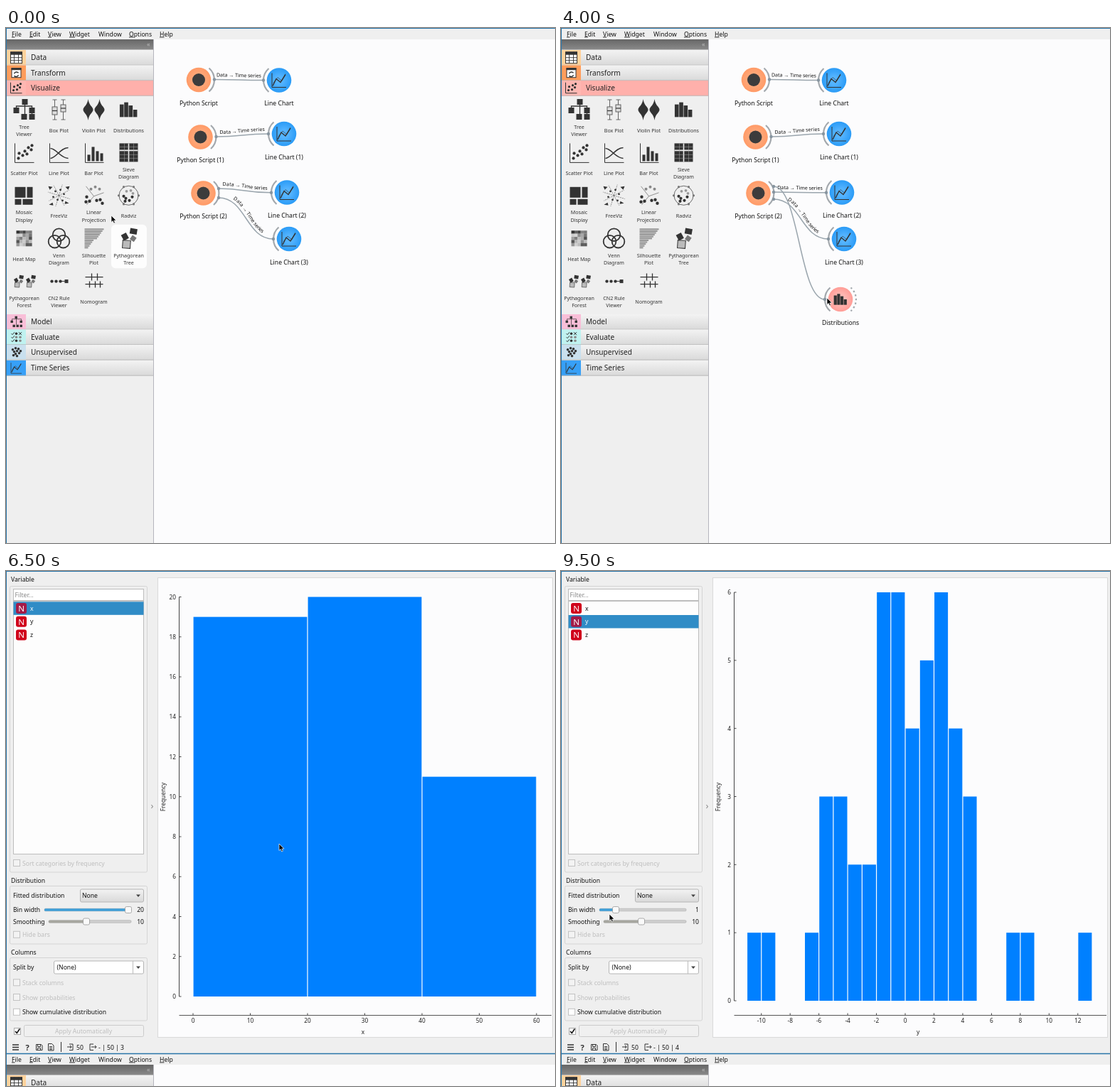
Recreate the animation shown at these times as an HTML page. Size 772 px wide and 725 px high, loop 10 s.

```html
<!DOCTYPE html>
<html lang="en">
<head>
<meta charset="utf-8">
<title>Visual workflow</title>
<style>
html, body { margin: 0; width: 100%; height: 100%; overflow: hidden; background: #fcfcfd; }
svg { display: block; width: 772px; height: 725px; font-family: "Noto Sans", "Open Sans", sans-serif; }
</style>
</head>
<body>
<svg id="stage" viewBox="0 0 772 725" xmlns="http://www.w3.org/2000/svg"></svg>
<script>
const STEP = 500, STEPS = 20;
const INK = '#333', BLUE = '#308cc6', BAR = '#0080ff', OFF = '#bebebe', EDGE = '#2874a8';
const stage = document.getElementById('stage');

// Drawing helpers
const rect = (x, y, w, h, fill, more = '') => `<rect x="${x}" y="${y}" width="${w}" height="${h}" fill="${fill}" ${more}/>`;
const dot = (x, y, r, fill = INK, more = '') => `<circle cx="${x}" cy="${y}" r="${r}" fill="${fill}" ${more}/>`;
const ring = (x, y, r, w = 1) => dot(x, y, r, 'none', `stroke="${INK}" stroke-width="${w}"`);
const line = (d, w = 1, color = INK, more = '') => `<path d="${d}" fill="none" stroke="${color}" stroke-width="${w}" ${more}/>`;
const fill = (d, color = INK) => `<path d="${d}" fill="${color}"/>`;
const text = (s, x, y, size = 8.65, color = '#111', more = '') => `<text x="${x}" y="${y}" font-size="${size}" fill="${color}" ${more}>${s}</text>`;
const mid = 'text-anchor="middle"', end = 'text-anchor="end"';
const at = (x, y, body, scale = 1) => `<g transform="translate(${x} ${y}) scale(${scale})">${body}</g>`;
const dots = (list, r) => list.map(([x, y]) => dot(x, y, r)).join('');
const boxes = (list, s) => list.map(([x, y]) => rect(x, y, s, s, INK)).join('');

const defs = `<defs>
  <linearGradient id="btn" x2="0" y2="1"><stop stop-color="#f3f3f3"/><stop offset="1" stop-color="#d9d9d9"/></linearGradient>
  <linearGradient id="head" x2="0" y2="1"><stop stop-color="#666"/><stop offset="1" stop-color="#8a8a8a"/></linearGradient>
  <radialGradient id="orange"><stop offset=".3" stop-color="#ffae82"/><stop offset="1" stop-color="#ff9a66"/></radialGradient>
  <radialGradient id="blue"><stop offset=".3" stop-color="#55b4ff"/><stop offset="1" stop-color="#2a9bf6"/></radialGradient>
  <radialGradient id="pink"><stop offset=".3" stop-color="#ffbdb8"/><stop offset="1" stop-color="#ff9c96"/></radialGradient>
  <filter id="soft" x="-50%" y="-50%" width="200%" height="200%"><feGaussianBlur stdDeviation="2"/></filter>
</defs>`;

// Icons, centred on 0,0
const histIcon = [[-17, 24], [-8.5, 28], [0, 22], [8.5, 14]].map(([x, h]) => rect(x, 14 - h, 7.6, h, INK)).join('');
const chartIcon = line('M-10-10V10H10', 1) + line('M-9 8L-4-2L2 3L9-8', 1.4) + line('M-8 4L-2-4L4 1L9-9', .6);
const treeIcon = boxes([[-2, -8], [-8, -2], [5, -2], [-5, 4], [0, 4], [5, 4]], 3.4) + line('M-6-2V-4H7V-2M0-5V4', .7);
const gridIcon = rect(-8, -8, 16, 16, '#fff', `stroke="${INK}"`) + rect(-8, -8, 16, 4, INK) + line('M-8 0H8M-8 4H8M-3-8V8M3-8V8', .9);
const swapIcon = rect(-6.5, -6.5, 13, 13, '#fff', `stroke="${INK}"`) + rect(-7, -7, 14, 3, INK) + line('M-3 1A3.5 3.5 0 0 1 3 0M3 3A3.5 3.5 0 0 1-3 4', 1.5);
const scatterIcon = line('M-8-8V7H8', 1) + dots([[-4, 3], [-3, -2], [1, 2], [2, -4], [5, -1], [6, -6]], 1.6);
const evalIcon = [-5, 0, 5].map(y => line(`M-7 ${y}l1.5 1.5l3-3.500`, 1) + dot(0, y, 1.8, y ? INK : '#888') + dot(5.5, y, y < 0 ? 0 : 1.8, '#888')).join('') + line('M3.500-7l4 4m0-4l-4 4', 1);
const clusterIcon = dots([[-5, -4], [-1, -6], [3, -5], [6, -2], [-3, -1], [1, -2], [4, 1], [-1, 2], [-4, 4], [1, 5]], 1.8);

const polar = (r, n, off = 0) => [...Array(n)].map((_, i) => [r * Math.cos(off + i * 2 * Math.PI / n), r * Math.sin(off + i * 2 * Math.PI / n)]);
const spokes = (r, n, off) => line(polar(r, n, off).map(([x, y]) => `M0 0L${x} ${y}`).join(''), .8, '#777', 'stroke-dasharray="2 1"');
const violin = x => fill(`M${x} -15C${x + 1} -6 ${x + 7} -4 ${x + 7} 0C${x + 7} 4 ${x + 1} 6 ${x} 15C${x - 1} 6 ${x - 7} 4 ${x - 7} 0C${x - 7} -4 ${x - 1} -6 ${x} -15`);
const whisker = (x, a, b) => line(`M${x - 3} -14H${x + 3}M${x} -14V${a}M${x} ${b}V14M${x - 3} 14H${x + 3}`, .9, '#555')
  + rect(x - 3.5, a, 7, b - a, '#ddd', 'stroke="#555" stroke-width=".9"') + line(`M${x - 3.5} ${(a + b) / 2}h7`, 1.2);
const pyth = rect(-8, 3, 11, 11, '#bbb', `stroke="${INK}" transform="rotate(4)"`)
  + rect(-9, -7, 8, 9, INK, 'transform="rotate(-28 -5 -2)"') + rect(3, -3, 7, 7, '#777', 'transform="rotate(35 7 0)"') + rect(0, -15, 10, 8, INK, 'transform="rotate(10)"');

const tools = [
  ['Tree|Viewer', boxes([[-3, -15], [-15, -3], [7, -3], [-4, 6], [7, 6]], 8) + line('M1-8V8M-11-3V-5H11V8', 1.3)],
  ['Box Plot', whisker(-6, -4, 7) + whisker(6, -7, 3)],
  ['Violin Plot', violin(-8) + violin(8)],
  ['Distributions', at(0, 0, histIcon, .74)],
  ['Scatter Plot', line('M-13-13V14H14', 1) + dots([[-8, 8], [-7, 1], [-2, 4], [1, -2], [4, 2], [6, -7], [10, -4], [11, -10]], 2.1)],
  ['Line Plot', line('M-13-13V14H14', 1) + line('M-12-6C-4-6 2 8 13 8M-12 8C-4 8 2-7 13-7', 1.5)],
  ['Bar Plot', line('M-12-13V14H14', 1) + [[-9, 9], [-3, 20], [3, 14], [9, 11]].map(([x, h]) => rect(x, 12 - h, 4, h, INK)).join('')],
  ['Sieve|Diagram', rect(-13, -13, 26, 26, INK) + line('M0-13V13M-13-3H13', 1.6, '#eee') + line('M-13-8H13M-13 3H13M-13 8H13M-6-13V13M7-13V13', .5, '#aaa')],
  ['Mosaic|Display', rect(-13, -12, 15, 15, INK) + rect(4, -12, 8, 15, INK) + rect(-13, 5, 9, 8, INK) + rect(-2, 5, 14, 8, INK)],
  ['FreeViz', spokes(16, 8, .3) + dots([[-5, -6], [2, -8], [7, -2], [-8, 2], [-2, 6], [5, 7]], 1.4) + fill('M-15-13l6 1l-4 4zM15-13l-6 1l4 4zM-14 13l5-3l1 4zM14 11l-5-3l-1 4z')],
  ['Linear|Projection', line('M0 1L-11-13M0 1L14-4M0 1L-10 13', .8, '#777') + dots([[-10, 2], [-6, 8], [-11, 9], [4, 7], [9, 6], [12, 11]], 2.2) + [[-4, -9], [2, -12], [8, -9]].map(p => dot(...p, 2, '#888')).join('')],
  ['Radviz', ring(0, 0, 13.5, .7) + polar(14, 6).map(p => dot(...p, 1.6, '#777')).join('') + dots([[-4, 4], [-7, 1], [-5, 8], [1, 7], [5, 2]], 2.1) + [[-3, -6], [3, -7], [6, -3]].map(p => dot(...p, 1.9, '#999')).join('')],
  ['Heat Map', [...Array(25)].map((_, i) => { const v = 50 + i * i * 47 % 170; return rect(i % 5 * 4.4 - 11, (i / 5 | 0) * 4.4 - 11, 4.5, 4.5, `rgb(${v},${v},${v})`); }).join('')],
  ['Venn|Diagram', ring(0, -5, 8.8, 1.8) + ring(-6, 4.5, 8.8, 1.8) + ring(6, 4.5, 8.8, 1.8)],
  ['Silhouette|Plot', [...Array(11)].map((_, i) => rect(-13, -14 + i * 2.6, 27 - i * 1.9 - (i > 5 ? 3 : 0), 2.2, '#999')).join('')],
  ['Pythagorean|Tree', pyth],
  ['Pythagorean|Forest', at(-8, 0, pyth, .6) + at(9, 0, pyth, .6)],
  ['CN2 Rule|Viewer', dots([[-10, 0], [-4, 0], [2, 0]], 2.2) + line('M3 0H9', 1) + rect(8, -2.5, 5, 5, INK)],
  ['Nomogram', line('M-12-6H13M-12 4H13M-3-11V-1M5-11V-1M-6 0V9M2 0V9M9 0V9', 1.3)]
];

const categories = [
  [31, 'Data', '#ffd29c', gridIcon], [52.5, 'Transform', '#ff9d5c', swapIcon], [74, 'Visualize', '#ffb7b2', scatterIcon],
  [403, 'Model', '#f9bfd8', treeIcon], [424.5, 'Evaluate', '#c0f2f0', evalIcon], [446, 'Unsupervised', '#c9e0ee', clusterIcon], [468, 'Time Series', '#37a0f7', at(0, 0, chartIcon, .75)]
];

const menu = () => [[8, 'File'], [33, 'Edit'], [59, 'View'], [89, 'Widget'], [130, 'Window'], [173, 'Options'], [216, 'Help']]
  .map(([x, s]) => text(s === 'Window' ? s : `<tspan text-decoration="underline">${s[0]}</tspan>${s.slice(1)}`, x, 11.5)).join('');

const cell = i => [25.5 + i % 4 * 49, 95.5 + (i / 4 | 0) * 60.4];

function sidebar(hover, pressed) {
  let s = rect(0, 0, 772, 16, '#efefef') + rect(0, 16, 208, 709, '#efefef') + rect(1, 16, 206, 14.5, 'url(#head)') + text('«', 198, 26, 9, '#bbb');
  for (const [y, name, color, icon] of categories) {
    s += rect(1, y, 206, 21.5, name === 'Visualize' ? '#ffb0ab' : 'url(#btn)') + rect(1, y, 27, 21.5, color)
      + line(`M1 ${y + 21.2}H207`, .8, '#b4b4b4') + at(14.5, y + 10.7, icon) + text(name, 35, y + 14.4, 10.05, '#222');
  }
  if (hover >= 0) {
    const [x, y] = cell(hover);
    s += rect(x - 24.5, y, 50, 61.5, '#fdfdfd', 'rx="6"');
  }
  if (pressed) s += rect(148, 96, 49, 60, '#9b9b9b', 'rx="6"');
  tools.forEach(([name, icon], i) => {
    const [x, y] = cell(i), rows = name.split('|');
    s += at(x, y + 19.5, icon) + rows.map((r, j) => text(r, x, y + (rows.length > 1 ? 46 + 10.3 * j : 51), 7.1, INK, mid)).join('');
  });
  return s + line('M207.5 16V725', 1, '#b5b5bd') + menu() + line('M0 .5H772', 1, EDGE) + line('M.5 0V725', 1, EDGE);
}

function arc(x, y, side, more = '') {
  const dx = 14.5 * side, dy = 16.5;
  return line(`M${x + dx} ${y - dy}A22 22 0 0 ${side > 0 ? 1 : 0} ${x + dx} ${y + dy}`, 2.2, '#a3a8ad', more);
}
const dotted = 'stroke-dasharray="2.4 3.4"';

function node(x, y, name, paint, icon, arcs) {
  return arcs + dot(x, y, 17.3, `url(#${paint})`) + at(x, y, icon) + text(name, x, y + 35.5, 8.65, '#111', mid);
}

function link(id, x1, y1, x2, y2, label) {
  const m = (x1 + x2) / 2, d = `M${x1} ${y1}C${m} ${y1} ${m} ${y2} ${x2} ${y2}`;
  return `<path id="${id}" d="${d}" fill="none" stroke="#9aa5ad" stroke-width="1.5"/>` + dot(x1, y1, 2.2, '#8795a0') + dot(x2, y2, 2.2, '#8795a0')
    + (label ? `<text font-size="7" fill="#111" text-anchor="middle" dy="-4"><textPath href="#${id}" startOffset="50%">${label}</textPath></text>` : '');
}

function canvas(k, pos) {
  const series = 'Data → Time series', linking = k >= 7, joined = k >= 8;
  const script = dot(0, 0, 9, '#3c3c3c');
  let s = rect(208, 16, 564, 709, '#fcfcfd');
  [[271, 73, ''], [273.5, 153.5, ' (1)'], [277.5, 232.5, ' (2)']].forEach(([x, y, n]) => s += node(x, y, 'Python Script' + n, 'orange', script, arc(x, y, 1)));
  [[384, 73.5, ''], [391, 149, ' (1)'], [395, 231.5, ' (2)'], [398, 297, ' (3)']].forEach(([x, y, n]) => s += node(x, y, 'Line Chart' + n, 'blue', chartIcon, arc(x, y, -1)));
  s += link('a', 293, 72.5, 362, 73.5, series) + link('b', 295.5, 153, 369, 149, series)
    + link('c', 299, linking ? 231 : 226, 373, 231.8, series) + link('d', 299, linking ? 241 : 239, 376, 297, series);
  if (k >= 5) {
    const x = 393, y = 382, selected = k < 7 || k === 12;
    if (selected) s += dot(x, y, 19, '#9fb8cc', 'filter="url(#soft)"');
    s += node(x, y, 'Distributions', 'pink', at(0, 0, histIcon, .55), (joined ? arc(x, y, -1) : '') + arc(x, y, 1, dotted));
    if (selected) s += rect(366.5, 407, 54, 14.5, BLUE, 'rx="1"') + text('Distributions', x, 417.5, 8.65, '#fff', mid);
  }
  if (linking) s += joined ? link('e', 299, 223, 371, 382, k > 10 ? 'Data' : '') : link('e', 299, 223, pos[0], pos[1]);
  return s;
}

function dialog() {
  const check = (x, y, on) => rect(x - 7.2, y - 7.2, 14.4, 14.4, '#fff', 'stroke="#111"') + (on ? line(`M${x - 7} ${y - 7}l14 14m0-14l-14 14`, 1, '#111') : '');
  const panel = x => rect(x, 607.5, 125.5, 98, '#ececec', 'rx="3" stroke="#cfcfcf"');
  const title = (s, x) => text(s, x, 722, 8.65, '#111', mid + ' font-weight="700"');
  return rect(228.5, 592.5, 318, 140, '#efefef', 'stroke="#c4c4b8"') + rect(236.5, 600.5, 303, 130, '#fdfdfd', 'stroke="#aaa"')
    + panel(243.5) + panel(404) + dot(273, 656, 17.5, '#3c3c3c') + at(500.5, 657, histIcon)
    + ['Data', 'Learner', 'Classifier', 'Object'].map((n, i) => text(n, 340, 626 + i * 22.3, 8.65, '#111', end) + check(354, 623 + i * 22.3, i === 1 || i === 2)).join('')
    + check(418, 656.5) + text('Data', 433, 660) + line('M354 623L418 656.5', 3, '#000', 'stroke-linecap="round"')
    + title('Python Script (2)', 306) + title('Distributions', 466.5);
}

// Unit bins of y, from -11 up; wider bins are sums of these.
const unitBins = [1, 1, 0, 0, 1, 3, 3, 2, 2, 6, 6, 4, 5, 6, 4, 3, 0, 0, 1, 1, 0, 0, 0, 1];
function binned(width) {
  const from = Math.floor(-11 / width) * width, counts = Array(Math.ceil((13 - from) / width)).fill(0);
  unitBins.forEach((n, i) => counts[Math.floor((i - 11 - from) / width)] += n);
  return { name: 'y', from, width, counts, left: 261.5, right: 747, top: 30, base: 605, tick: 2 };
}
const xBins = { name: 'x', from: 0, width: 20, counts: [19, 20, 11], left: 263, right: 746, top: 36.5, base: 599, tick: 10 };

function chart({ name, from, width, counts, left, right, top, base, tick }) {
  const peak = Math.max(...counts), to = from + width * counts.length;
  const px = v => left + (v - from) / (to - from) * (right - left), py = v => base - v / peak * (base - top);
  let s = rect(213.5, 9.5, 555, 647, '#fcfcfd', 'stroke="#dadada"');
  counts.forEach((n, i) => {
    const x = px(from + i * width);
    if (n) s += rect(x + .6, py(n), px(from + (i + 1) * width) - x - 1.2, base - py(n), BAR);
  });
  for (let v = 0, step = peak > 10 ? 2 : 1; v <= peak; v += step)
    s += line(`M243.5 ${py(v)}h3`, 1, '#444') + text(v, 239, py(v) + 3.2, 8.3, '#222', end);
  for (let v = Math.ceil(from / tick) * tick; v <= to; v += tick)
    s += line(`M${px(v)} 625.5v-3`, 1, '#444') + text(v, px(v), 635.5, 8.3, '#222', mid);
  return s + line(`M243.5 ${top}V${base}`, 1, '#444') + line('M243.5 625.5H767', 1, '#555')
    + text(name, 502, 652, 8.3, '#222', mid) + text('Frequency', 0, 0, 8.3, '#222', mid + ' transform="translate(224 318) rotate(-90)"');
}

function options(y, width, handle) {
  const frame = (a, b) => rect(5.5, a, 193, b - a, 'none', 'stroke="#d4d4d4" rx="2"');
  const check = (label, ty, color = OFF) => rect(10.5, ty - 8, 9, 9, color === OFF ? '#f3f3f3' : '#fff', 'stroke="#c2c2c2"') + text(label, 23, ty, 8.65, color);
  const combo = (x, ty, label, bg) => rect(x, ty, 193.5 - x, 18, bg, 'stroke="#b5b5b5" rx="2"') + text(label, x + (x > 90 ? 2.5 : 4), ty + 12.3) + fill(`M183 ${ty + 7.5}h6l-3 3.5z`, '#444');
  const slider = (a, ty, pos, color) => rect(a, ty - 1.8, 176 - a, 3.6, '#cfcfcf', 'rx="1.5" stroke="#aaa" stroke-width=".6"')
    + rect(a, ty - 1.8, pos - a, 3.6, color, 'rx="1.5"') + rect(pos - 4.5, ty - 4.5, 9, 9, '#fafafa', 'rx="2" stroke="#999" stroke-width=".8"');
  const vars = ['x', 'y', 'z'].map((n, i) => {
    const ty = 43.3 + i * 18.7, on = i === (y ? 1 : 0);
    return (on ? rect(10.5, ty, 183, 18.5, BLUE) : '') + rect(14, ty + 1.8, 15, 15, on ? '#a31b48' : '#d0021b', 'rx="3"')
      + text('N', 21.5, ty + 13.5, 11.5, '#fff', mid) + text(n, 34, ty + 12.4, 8.65, on ? '#fff' : '#111');
  }).join('');
  return text('Variable', 7, 15) + frame(21.5, 424) + rect(10.5, 25.5, 183, 16, '#fff', 'stroke="#bdbdbd"') + text('Filter...', 12.5, 36.7, 8.65, '#888')
    + rect(10.5, 42.5, 183, 356, '#fdfdfd', 'stroke="#bdbdbd"') + vars + check('Sort categories by frequency', 414.5)
    + text('Distribution', 7, 438.7) + frame(443.5, 525) + text('Fitted distribution', 10, 460.3) + combo(104.5, 448, 'None', 'url(#btn)')
    + text('Bin width', 10, 480.3) + slider(54, 477, handle, '#3f9fd8') + text(width, 194, 480.3, 8.65, '#111', end)
    + text('Smoothing', 10, 496.6) + slider(60, 493.5, 113, '#a6a69f') + text(10, 194, 496.6, 8.65, '#111', end) + check('Hide bars', 515.3)
    + text('Columns', 7, 539.8) + frame(544.5, 633) + text('Split by', 10, 561.3) + combo(67.5, 549, '(None)', '#fff') + line('M178.5 549V567', 1, '#bbb')
    + check('Stack columns', 582.8) + check('Show probabilities', 603.5) + check('Show cumulative distribution', 624.3, '#111')
    + rect(11.5, 643.5, 9, 9, '#fff', 'stroke="#aaa"') + line('M13 648l2.3 2.5l4-6', 1.6, '#111')
    + rect(25.5, 639.5, 168, 16, '#f0f0f0', 'stroke="#cbcbcb" rx="2"') + text('Apply Automatically', 109, 650.8, 8.65, OFF, mid);
}

function status(bins) {
  return line('M9 667h9M9 670.5h9M9 674h9', 1.5) + text('?', 27.5, 674.5, 11, INK, 'font-weight="700"')
    + line('M42.5 666.5h7l1.5 1.5v6.5h-8.5zM44.5 666.5v3h4v-3M44.5 674.5v-3h4v3', 1) + line('M59.5 665.5h5l2.5 2.5v7h-7.5zM61 669.5h4M61 671.5h4M61 673.5h4', 1)
    + line('M77.5 663V677', 1) + line('M89 666h5v8.5h-5M86 670h6M90 668l2.2 2l-2.2 2', 1) + text('50', 99, 673.6)
    + line('M123 666h-5v8.5h5M120 670h7M125 668l2.2 2l-2.2 2', 1) + text(`- | 50 | ${bins}`, 130, 673.6);
}

// Slider stops are evenly spaced over these widths.
const stops = [0.5, 1, 2, 2.5, 5, 10, 20];

function chartWindow(k) {
  const y = k >= 15, width = !y ? 20 : k < 18 ? 10 : k === 18 ? 2 : 1;
  return rect(0, 0, 772, 680, '#efefef') + options(y, width, 58 + 19 * stops.indexOf(width)) + chart(y ? binned(width) : xBins) + text('›', 203.5, 334.5, 13, '#888')
    + status(y ? 4 : 3) + line('M0 .5H772', 1, EDGE) + line('M.5 0V680', 1, EDGE);
}

// Pointer stops as [step, x, y]; it glides between them and leaves the stage for the dialog button.
const path = [[0, 148, 264], [2, 166, 121], [3, 166, 120], [5, 393, 380], [6, 302, 247], [8, 374, 380], [9, 380, 388], [10, 508, 790],
  [12, 384, 384], [13, 384, 384], [15, 62, 73], [16, 108, 425], [17, 152, 478], [19, 68, 483]];
function pointer(k) {
  const i = Math.max(1, path.findIndex(p => p[0] >= k)), [a, ax, ay] = path[i - 1], [b, bx, by] = path[i];
  const u = (k - a) / (b - a);
  return [ax + (bx - ax) * u, ay + (by - ay) * u];
}
const arrow = '<path d="M0 0V9.5L2.2 7.5L3.7 11L5.4 10.2L3.9 7H7Z" fill="#000" stroke="#fff" stroke-width=".7"/>';

function scene(k) {
  const pos = pointer(k);
  let s = defs;
  if (k < 13) {
    s += canvas(k, pos) + sidebar([15, 7, 3][k] ?? -1, k === 3);
    if (k === 4) s += `<g opacity=".8">${at(pos[0], pos[1], histIcon, .74)}</g>`;
    if (k === 9 || k === 10) s += dialog();
  } else {
    s += at(0, 679, rect(208, 16, 564, 40, '#fcfcfd') + sidebar(-1, false)) + chartWindow(k) + line('M0 679.5H772', 1.4, EDGE);
  }
  return s + at(pos[0], pos[1], arrow);
}

let shown = -1;
function draw(now) {
  const k = Math.floor(now / STEP) % STEPS;
  if (k !== shown) stage.innerHTML = scene(shown = k);
  requestAnimationFrame(draw);
}
draw(performance.now());
</script>
</body>
</html>
```
